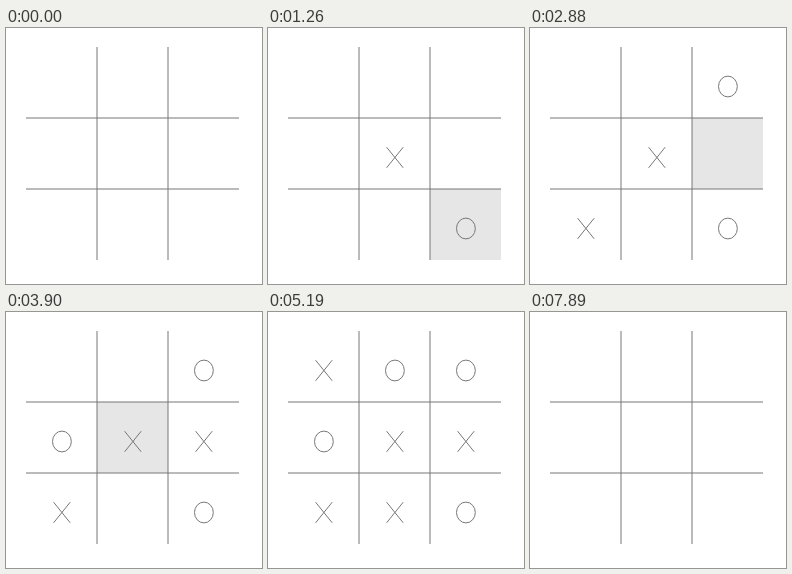
Write an HTML page with a canvas that moves like this. It is 256 px wide and 256 px high and loops after 7.98 s.

```html
<!DOCTYPE html>
<html lang="en">
<head>
<meta charset="utf-8">
<title>Noughts and crosses</title>
<style>
  html, body { margin: 0; width: 100%; height: 100%; overflow: hidden; background: #fff; }
  canvas { display: block; width: 256px; height: 256px; }
</style>
</head>
<body>
<canvas id="stage"></canvas>
<script>
const SIZE = 256, LOOP = 7980;
const LEFT = 20, TOP = 19, CELL = 71, BOARD = 3 * CELL;
const INK = '#777', SHADE = '#e6e6e6';
const TICK = 30, STEP = 60, LEAD = 270;
const FLASH = 5610, CLEAR = 6690, ECHO = 6990, END = 7890, PERIOD = 600;

const at = cell => ({ col: cell % 3, row: Math.floor(cell / 3) });

// X and O take turns, X first; the pace quickens as the board fills.
const moves = [4, 8, 6, 2, 5, 3, 7, 1, 0].map((cell, i) => ({
  ...at(cell),
  cross: i % 2 === 0,
  time: Math.floor((600 + 689 * i - 14 * i * i) / TICK) * TICK
}));
const start = { col: 3, row: 2 };
const last = moves[moves.length - 1];

const canvas = document.getElementById('stage');
const ctx = canvas.getContext('2d');
const ratio = window.devicePixelRatio || 1;
canvas.width = canvas.height = Math.round(SIZE * ratio);
ctx.scale(ratio, ratio);

const toward = (from, to, steps) =>
  from + Math.sign(to - from) * Math.min(steps, Math.abs(to - from));

// The pointer steps cell by cell, along the row first, and arrives before each mark.
function pointer(t) {
  const i = moves.findIndex(move => t < move.time);
  const from = i > 0 ? moves[i - 1] : start, to = moves[i];
  const across = Math.abs(to.col - from.col);
  const total = across + Math.abs(to.row - from.row);
  const steps = Math.max(0, total + Math.floor((t - to.time + LEAD) / STEP));
  return {
    col: toward(from.col, to.col, steps),
    row: toward(from.row, to.row, Math.max(0, steps - across))
  };
}

function shade(col, row) {
  ctx.fillStyle = SHADE;
  ctx.fillRect(LEFT + CELL * col, TOP + CELL * row, CELL, CELL);
}

function line(x1, y1, x2, y2) {
  ctx.beginPath();
  ctx.moveTo(x1, y1);
  ctx.lineTo(x2, y2);
  ctx.stroke();
}

function grid() {
  for (const i of [1, 2]) {
    const x = LEFT + CELL * i, y = TOP + CELL * i;
    line(x, TOP, x, TOP + BOARD);
    line(LEFT, y, LEFT + BOARD, y);
  }
}

function mark({ col, row, cross }) {
  const x = LEFT + CELL * (col + 0.5) + 0.4, y = TOP + CELL * (row + 0.5) + 4;
  if (cross) {
    line(x - 8.3, y - 10.3, x + 8.3, y + 10.3);
    line(x + 8.3, y - 10.3, x - 8.3, y + 10.3);
  } else {
    ctx.beginPath();
    ctx.ellipse(x, y, 9.4, 10.4, 0, 0, Math.PI * 2);
    ctx.stroke();
  }
}

function draw(t) {
  ctx.fillStyle = '#fff';
  ctx.fillRect(0, 0, SIZE, SIZE);

  if (t < last.time) {
    const { col, row } = pointer(t);
    if (col < 3) shade(col, row);
  } else if (t >= FLASH && t < CLEAR && (t - FLASH) % PERIOD < 210) {
    ctx.fillStyle = SHADE;
    ctx.fillRect(LEFT, TOP, BOARD, BOARD);
  }

  ctx.strokeStyle = INK;
  ctx.lineWidth = 1;
  grid();

  if (t < CLEAR) {
    moves.filter(move => t >= move.time).forEach(mark);
  } else if (t >= ECHO && t < END && (t - ECHO) % PERIOD < 300) {
    ctx.globalAlpha = 0.3;
    for (const col of [1, 2]) mark({ col, row: 1, cross: true });
    ctx.globalAlpha = 1;
  }
}

const begin = performance.now();
function frame() {
  draw((performance.now() - begin) % LOOP);
  requestAnimationFrame(frame);
}
draw(0);
requestAnimationFrame(frame);
</script>
</body>
</html>
```
